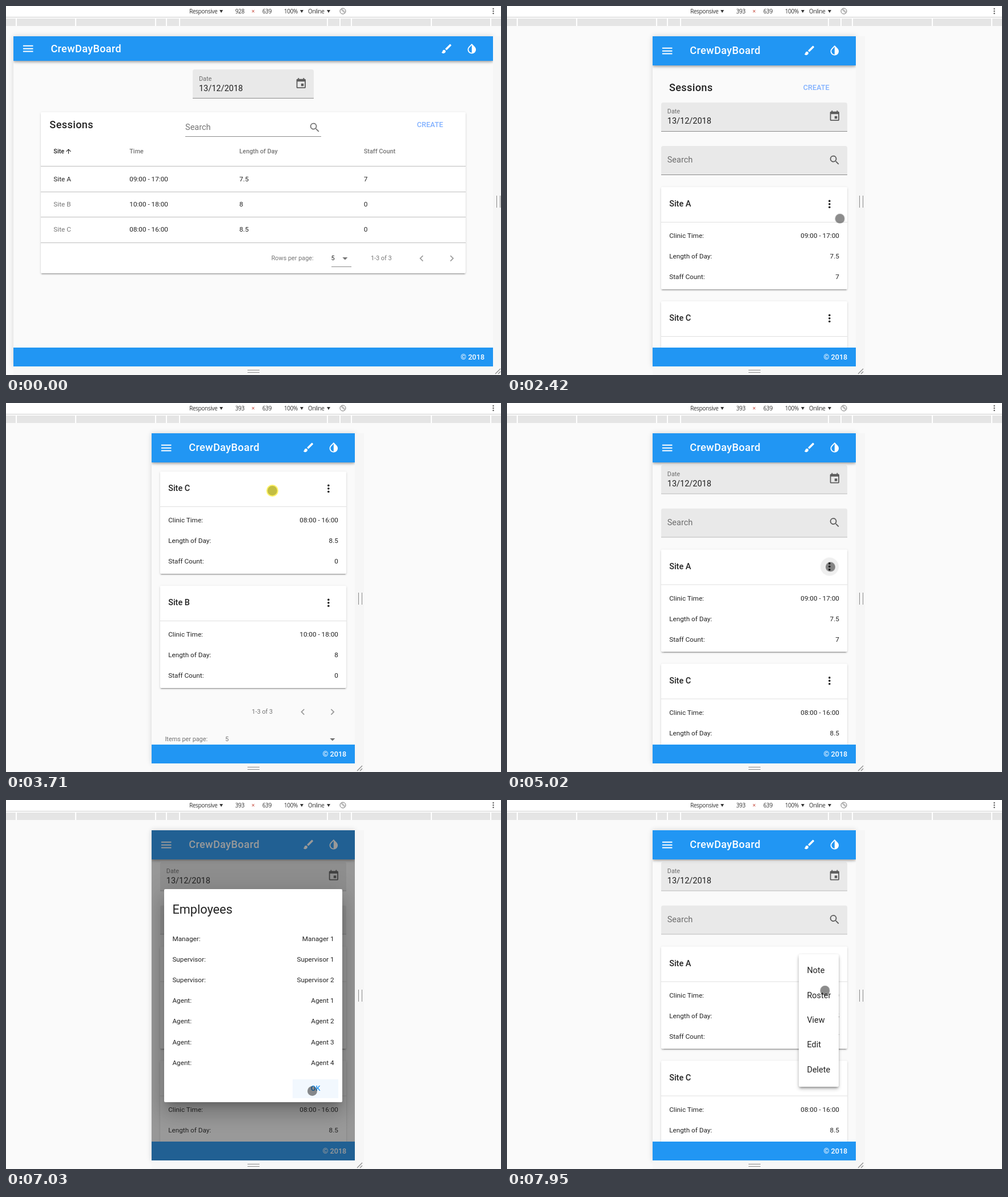
Recreate the animation shown at these times as an HTML page. Size 867 by 646 pixels, loop 8000 ms.

```html
<!DOCTYPE html>
<html lang="en">
<head>
<meta charset="utf-8">
<title>Sessions</title>
<style>
@property --w { syntax: "<integer>"; inherits: true; initial-value: 928; }
@property --lw { syntax: "<integer>"; inherits: true; initial-value: 928; }

html, body { margin: 0; width: 100%; height: 100%; overflow: hidden; }
.stage {
  position: relative; width: 867px; height: 646px; overflow: hidden;
  background: #fafafa; color: rgba(0,0,0,.87);
  font: 11.75px Roboto, sans-serif;
  --half: calc(var(--w) * .45215px);
  animation: resize 8s linear infinite;
}
.stage * { box-sizing: border-box; }
.stage div, .stage svg, p { position: absolute; }
p { margin: -10px 0 0; top: calc(var(--y) * 1px); line-height: 20px; white-space: nowrap; }
.i { width: 21.7px; height: 21.7px; margin: -10.85px; fill: currentColor; top: calc(var(--y) * 1px); }
.dim { color: rgba(0,0,0,.54); }
.small { font-size: 10.85px; }
.body { font-size: 14.47px; }
.med { font-weight: 500; }
.title { font-size: 18.1px; font-weight: 500; letter-spacing: .02em; }
.create { font-size: 12.66px; font-weight: 500; color: #82b1ff; }

/* browser chrome */
.tools { width: 100%; height: 20px; background: #fff; border-bottom: 1px solid #d0d0d0;
  font: 10px "Open Sans", sans-serif; letter-spacing: -.35px; color: #333; }
.tools p { top: 9px; }
.tools i { display: inline-block; margin-left: 4px; vertical-align: 1.5px; border: solid transparent; border-width: 5px 3px 0; border-top-color: #333; }
.width::after { counter-reset: w var(--w); content: counter(w); }
.ruler { top: 22px; width: 100%; height: 12.5px; background: #e5e5e5; }
.ruler div { width: 2px; height: 100%; background: #fff; }
.strip { top: 53px; left: calc(433px + var(--half)); width: 16px; height: 578px; background: #f6f6f6; animation: hot 8s step-end infinite; }
.strip::after { content: ""; position: absolute; left: 6px; top: 279px; width: 5px; height: 21px; border: solid #8a8a8a; border-width: 0 1px; }
.base { top: 631px; left: calc(433px - var(--half)); width: calc(2 * var(--half) + 16px); height: 15px; background: #f7f7f7; }
.grip { left: 423px; top: 637px; width: 21px; height: 5px; border: solid #8a8a8a; border-width: 1px 0; }
.corner { left: calc(433px + var(--half) + 3px); top: 634px; width: 11px; height: 11px; fill: none; stroke: #8a8a8a; stroke-width: 1.2; }

/* page; vertical positions count from the stage top */
.dev { top: 53px; left: calc(433px - var(--half)); width: calc(2 * var(--half)); height: 578px; overflow: hidden; background: #fafafa; }
.glow { top: 53px; left: calc(433px - var(--half)); width: calc(2 * var(--half)); height: 578px; box-shadow: 0 0 9px rgba(0,0,0,.16); }
.app { top: -53px; left: 0; width: calc(var(--lw) * .9043px); height: 631px; }
.fill { inset: 0; }
.bar { top: 53px; width: 100%; height: 43.4px; color: #fff; background: #2196f3;
  box-shadow: 0 2px 4px -1px rgba(0,0,0,.2), 0 3px 4px rgba(0,0,0,.14), 0 1px 8px rgba(0,0,0,.12);
  animation: bar 8s step-end infinite; }
.bar > * { top: 50%; }
.foot { top: 598px; width: 100%; height: 33px; background: #2196f3; color: #fff; font-size: 12.66px; }
.field { height: 51px; background: rgba(0,0,0,.065); border-bottom: 1px solid #8b8b8b; border-radius: 3.6px 3.6px 0 0; }
.field p { left: 11px; }
.field .i { right: 22px; color: rgba(0,0,0,.6); }
.card { background: #fff; border-radius: 2px;
  box-shadow: 0 3px 1px -2px rgba(0,0,0,.2), 0 2px 2px rgba(0,0,0,.14), 0 1px 4px rgba(0,0,0,.12); }

.desk { animation: leave 8s step-end infinite; }
.desk .field { left: calc(50% - 106px); top: 111px; width: 212px; }
.desk .card { top: 186px; height: 282px; left: calc(15.5px + 3.87%); right: calc(15.5px + 3.87%); }
.find { left: 34%; width: 32%; top: 0; height: 43px; border-bottom: 1px solid #8b8b8b; }
.line { width: 100%; height: 1px; background: #bdbdbd; top: calc(var(--y) * 1px); }
.c0 { left: 22px; }
.c1 { left: calc(18.06% + 20.7px); }
.c2 { left: calc(44.4% + 17.4px); }
.c3 { left: calc(73.6% + 18.4px); }

.mob { animation: enter 8s step-end infinite; }
.scroll { animation: scroll 8s ease-in-out infinite; }
.mob .field, .mob .card { left: 14.4px; right: 14.4px; }
.mob .card { height: 178.5px; }
.mob .card p { left: 14.4px; }
.card .r, .dialog .r { left: auto !important; right: 14.4px; }
.mob .line { background: #e0e0e0; }
.ring { right: 15px; top: 14px; width: 32px; height: 32px; border-radius: 50%; background: #efefef; opacity: 0; }
.first .ring { animation: ring 8s linear infinite; }

.menu { top: 270.3px; right: 29.7px; width: 70px; height: 231.7px; padding: 7.2px 14.4px; background: #fff; border-radius: 2px;
  font-size: 14.47px; line-height: 43.4px; transform-origin: 100% 0;
  box-shadow: 0 4px 4px -2px rgba(0,0,0,.22), 0 4px 6px rgba(0,0,0,.2), 0 1px 4px rgba(0,0,0,.14);
  animation: menu 8s ease-out infinite; }
.shade { background: #212121; animation: shade 8s ease-out infinite; }
.dialog { top: 155.5px; left: 21.7px; right: 21.7px; height: 372.5px; background: #fff; border-radius: 2px;
  box-shadow: 0 10px 13px -6px rgba(0,0,0,.2), 0 20px 34px 3px rgba(0,0,0,.14), 0 8px 40px 7px rgba(0,0,0,.12);
  animation: dialog 8s ease-out infinite; }
.dialog p { left: 14.4px; }
.ok { right: 7.2px; top: 333px; width: 79.5px; height: 33px; line-height: 31px; text-align: center; color: #2196f3;
  font-size: 12.66px; font-weight: 500; animation: ok 8s step-end infinite; }

/* pointers */
.touch { left: -8.5px; top: -8.5px; width: 17px; height: 17px; border-radius: 50%; background: rgba(0,0,0,.45);
  animation: touch 8s ease-in-out infinite, enterTouch 8s step-end infinite; }
.touch::after { content: ""; position: absolute; inset: -2px; border-radius: 50%; background: #c3be42; border: 2px solid #fff36b;
  animation: press 8s step-end infinite; }
.drag { left: -11px; top: 331.5px; width: 22px; height: 22px; animation: drag 8s linear infinite, leaveDrag 8s step-end infinite; }
.drag circle { fill: #fff23c; animation: hold 8s step-end infinite; }
.drag path { fill: #fffbc0; stroke: #333; stroke-width: 1; }

@keyframes resize {
  0%, 12.5% { --w: 928; }
  0%, 13.5% { --lw: 928; }
  15.4% { --w: 756; }
  16.375% { --w: 694; --lw: 756; animation-timing-function: ease-out; }
  17.4% { --lw: 694; animation-timing-function: ease-out; }
  23.25% { --w: 393; --lw: 404; }
  26.1% { --lw: 404; }
  26.15%, 100% { --lw: 393; }
  100% { --w: 393; }
}
@keyframes hot { 0% { background: #f6f6f6; } 9.6% { background: #ededed; } 26.6%, 100% { background: #f6f6f6; } }
@keyframes bar { 0% { height: 43.4px; } 18.6%, 100% { height: 50.6px; } }
@keyframes leave { 0% { opacity: 1; } 18.6%, 100% { opacity: 0; } }
@keyframes enter { 0% { opacity: 0; } 18.6%, 100% { opacity: 1; } }
@keyframes scroll {
  0%, 36.5% { transform: none; }
  44.4%, 46.4% { transform: translateY(-397px); }
  52.5%, 100% { transform: translateY(-60.5px); }
}
@keyframes ring {
  0%, 60.8% { opacity: 0; } 61.6%, 71.5% { opacity: 1; }
  72.5%, 94% { opacity: 0; } 94.6%, 100% { opacity: 1; }
}
@keyframes menu {
  0%, 63.8% { opacity: 0; transform: scale(.3); }
  66.2%, 71.4% { opacity: 1; transform: none; }
  73%, 73.1% { opacity: 0; transform: none; }
  73.2%, 95.4% { opacity: 0; transform: scale(.3); }
  97.4%, 100% { opacity: 1; transform: none; }
}
@keyframes shade { 0%, 71.5% { opacity: 0; } 74.5%, 90% { opacity: .46; } 91.7%, 100% { opacity: 0; } }
@keyframes dialog {
  0%, 71.5% { opacity: 0; transform: scale(.5); }
  74.5%, 90% { opacity: 1; transform: none; }
  91.7%, 100% { opacity: 0; transform: scale(.5); }
}
@keyframes ok { 0% { background: none; } 84.8%, 100% { background: #f2f8fe; } }
@keyframes touch {
  0%, 26.6% { transform: translate(619px, 343px); animation-timing-function: ease-in; }
  30.25% { transform: translate(583px, 371px); animation-timing-function: ease-out; }
  35.5%, 36.5% { transform: translate(478px, 550px); }
  44.4%, 46.4% { transform: translate(466px, 153px); }
  52.5% { transform: translate(476px, 489px); }
  56.2%, 56.9% { transform: translate(569px, 349px); }
  59%, 64.4% { transform: translate(566px, 286.5px); }
  70.5%, 76% { transform: translate(546px, 386px); }
  86%, 90% { transform: translate(536px, 509px); }
  94%, 96% { transform: translate(566px, 286.5px); }
  99.3%, 100% { transform: translate(556.5px, 333px); }
}
@keyframes enterTouch { 0% { opacity: 0; } 26.6%, 100% { opacity: 1; } }
@keyframes press {
  0% { opacity: 0; } 36% { opacity: 1; } 44.4% { opacity: 0; }
  46.3% { opacity: 1; } 52.5% { opacity: 0; }
  60.8% { opacity: 1; } 62.6% { opacity: 0; }
  70.5% { opacity: 1; } 71.5% { opacity: 0; }
  89% { opacity: 1; } 90% { opacity: 0; }
  94.3% { opacity: 1; } 95.4%, 100% { opacity: 0; }
}
@keyframes drag {
  0%, 9.4% { transform: translateX(880px); }
  11.5%, 12.5% { transform: translateX(861px); }
  16.375% { transform: translateX(740.5px); animation-timing-function: ease-out; }
  23.25%, 100% { transform: translateX(619px); }
}
@keyframes leaveDrag { 0% { opacity: 1; } 26.6%, 100% { opacity: 0; } }
@keyframes hold { 0% { opacity: 0; } 12.5% { opacity: 1; } 26.1%, 100% { opacity: 0; } }
</style>
</head>
<body>
<svg width="0" height="0" style="position:absolute">
  <symbol id="menu" viewBox="0 0 24 24"><path d="M3 18h18v-2H3zm0-5h18v-2H3zm0-7v2h18V6z"/></symbol>
  <symbol id="brush" viewBox="0 0 24 24"><path d="M7 14c-1.66 0-3 1.34-3 3 0 1.31-1.16 2-2 2 .92 1.22 2.49 2 4 2 2.21 0 4-1.79 4-4 0-1.66-1.34-3-3-3zm13.71-9.37l-1.34-1.34c-.39-.39-1.02-.39-1.41 0L9 12.25 11.75 15l8.96-8.96c.39-.39.39-1.02 0-1.41z"/></symbol>
  <symbol id="drop" viewBox="0 0 24 24"><path d="M17.66 7.93L12 2.27 6.34 7.93c-3.12 3.12-3.12 8.19 0 11.31a8 8 0 0 0 11.32 0c3.12-3.12 3.12-8.19 0-11.31zM12 19.59a6 6 0 0 1-4.24-10.24L12 5.1z"/></symbol>
  <symbol id="date" viewBox="0 0 24 24"><path d="M17 12h-5v5h5zM16 1v2H8V1H6v2H5c-1.1 0-2 .9-2 2v14c0 1.1.9 2 2 2h14c1.1 0 2-.9 2-2V5c0-1.1-.9-2-2-2h-1V1zm3 18H5V8h14z"/></symbol>
  <symbol id="search" viewBox="0 0 24 24"><path d="M15.5 14h-.79l-.28-.27A6.5 6.5 0 1 0 13.73 14.43l.27.28v.79l5 4.99L20.49 19zm-6 0a4.5 4.5 0 1 1 0-9 4.5 4.5 0 0 1 0 9z"/></symbol>
  <symbol id="up" viewBox="0 0 24 24"><path d="M4 12l1.41 1.41L11 7.83V20h2V7.83l5.58 5.59L20 12l-8-8z"/></symbol>
  <symbol id="more" viewBox="0 0 24 24"><circle cx="12" cy="6" r="2"/><circle cx="12" cy="12" r="2"/><circle cx="12" cy="18" r="2"/></symbol>
  <symbol id="prev" viewBox="0 0 24 24"><path d="M15.41 7.41L14 6l-6 6 6 6 1.41-1.41L10.83 12z"/></symbol>
  <symbol id="next" viewBox="0 0 24 24"><path d="M10 6L8.59 7.41 13.17 12l-4.58 4.59L10 18l6-6z"/></symbol>
  <symbol id="down" viewBox="0 0 24 24"><path d="M7 10l5 5 5-5z"/></symbol>
</svg>

<div class="stage">
  <div class="tools">
    <p style="left:321px">Responsive<i></i></p>
    <p class="width" style="left:401.5px"></p>
    <p style="left:430px;color:#c0392b">×</p>
    <p style="left:449px">639</p>
    <p style="left:487px">100%<i></i></p>
    <p style="left:529px">Online<i></i></p>
    <svg style="left:584px;top:3px" width="12" height="12" fill="none" stroke="#777"><circle cx="6" cy="6" r="5"/><path d="M2.5 2.5l7 7M4.5 2.2l5.2 5.2"/></svg>
    <svg style="left:851px;top:3px" width="5" height="12" fill="#555"><circle cx="2.5" cy="2" r="1.2"/><circle cx="2.5" cy="6" r="1.2"/><circle cx="2.5" cy="10" r="1.2"/></svg>
  </div>
  <div class="ruler" id="ruler"></div>

  <div class="glow"></div>
  <div class="base"></div>
  <div class="strip"></div>
  <div class="grip"></div>
  <svg class="corner" viewBox="0 0 11 11"><path d="M1 10L10 1M6 10l4-4"/></svg>

  <div class="dev"><div class="app">
    <div class="fill desk" id="desk"></div>
    <div class="fill mob"><div class="fill scroll" id="mob"></div></div>
    <div class="bar">
      <svg class="i" style="left:25.6px;width:23.4px;height:23.4px;margin:-11.7px"><use href="#menu"/></svg>
      <p class="title" style="left:65px">CrewDayBoard</p>
      <svg class="i" style="right:80.5px"><use href="#brush"/></svg>
      <svg class="i" style="right:36.8px"><use href="#drop"/></svg>
    </div>
    <div class="foot"><p class="med" style="right:14.4px;--y:16.5">© 2018</p></div>
    <div class="menu">Note<br>Roster<br>View<br>Edit<br>Delete</div>
    <div class="fill shade"></div>
    <div class="dialog" id="dialog"></div>
  </div></div>

  <div class="touch"></div>
  <svg class="drag" viewBox="-11 -11 22 22"><circle r="10.5"/><path d="M-10 0l5-4.5v3H5v-3L10 0 5 4.5v-3H-5v3z"/></svg>
</div>

<script>
const $ = id => document.getElementById(id);
const text = (s, y, cls = "", pos = "") => `<p class="${cls}" style="--y:${y};${pos}">${s}</p>`;
const icon = (name, y, pos = "", cls = "") => `<svg class="i ${cls}" style="--y:${y};${pos}"><use href="#${name}"/></svg>`;
const line = y => `<div class="line" style="--y:${y}"></div>`;
const pair = (label, value, y) => text(label, y) + text(value, y, "r");
const field = (top, inner) => `<div class="field" style="top:${top}px">${inner}</div>`;
const dateField = top => field(top, text("Date", 16.5, "small dim") + text("13/12/2018", 33.5, "body") + icon("date", 24.5));

const sites = {
  A: ["09:00 - 17:00", "7.5", 7],
  B: ["10:00 - 18:00", "8", 0],
  C: ["08:00 - 16:00", "8.5", 0]
};

$("ruler").innerHTML = [129.5, 152, 171.5, 311.5, 415.5]
  .flatMap(d => [432 - d, 432 + d])
  .map(x => `<div style="left:${Math.round(x)}px"></div>`).join("");

const rows = Object.entries(sites).map(([id, cells], r) => {
  const y = 116.5 + r * 44.4;
  return text("Site " + id, y, r ? "c0 dim" : "c0")
    + cells.map((c, i) => text(c, y, "c" + (i + 1))).join("") + line(138.5 + r * 44.5);
}).join("");
const heads = ["Time", "Length of Day", "Staff Count"]
  .map((h, i) => text(h, 68.5, `small med dim c${i + 1}`)).join("");

$("desk").innerHTML = dateField(111) + `<div class="card">
  ${text("Sessions", 22, "title", "left:15px")}
  <div class="find">${text("Search", 27, "body dim") + icon("search", 27, "right:11.5px", "dim")}</div>
  ${text("CREATE", 22, "create", "right:39px")}
  ${text("Site", 68.5, "small med c0")}${icon("up", 68, "left:48.5px;width:13px;height:13px;margin:-6.5px")}
  ${heads}${line(94)}${rows}
  ${text("Rows per page:", 255.5, "small dim", "right:266px")}
  ${text("5", 255.5, "small", "right:229px")}
  ${icon("down", 255.5, "right:211px", "dim")}
  <div style="right:200px;top:270px;width:35px;height:1px;background:#8b8b8b"></div>
  ${text("1-3 of 3", 255.5, "small dim", "right:129px")}
  ${icon("prev", 255.5, "right:77px;opacity:.7", "dim")}${icon("next", 255.5, "right:24px;opacity:.7", "dim")}
</div>`;

const cards = ["A", "C", "B"].map((id, i) => {
  const [time, length, staff] = sites[id];
  return `<div class="card ${i ? "" : "first"}" style="top:${317 + i * 200}px"><div class="ring"></div>
    ${text("Site " + id, 30, "body med")}${icon("more", 30.3, "right:31px")}${line(61)}
    ${pair("Clinic Time:", time, 84.5)}${pair("Length of Day:", length, 120.7)}${pair("Staff Count:", staff, 156.9)}</div>`;
}).join("");

$("mob").innerHTML = text("Sessions", 143, "title", "left:28.5px")
  + text("CREATE", 143, "create", "right:46px")
  + dateField(168.5)
  + field(244.5, text("Search", 25, "body dim") + icon("search", 25))
  + cards
  + text("1-3 of 3", 938, "small dim", "right:143.5px")
  + icon("prev", 938, "right:91px;opacity:.7", "dim") + icon("next", 938, "right:38.5px;opacity:.7", "dim")
  + text("Items per page:", 986, "small dim", "left:23px")
  + text("5", 986, "small dim", "left:128.5px") + icon("down", 986, "right:38.5px", "dim");

const staff = ["Manager 1", "Supervisor 1", "Supervisor 2", "Agent 1", "Agent 2", "Agent 3", "Agent 4"];
$("dialog").innerHTML = text("Employees", 36, "", "font-size:21.7px")
  + staff.map((s, i) => pair(s.split(" ")[0] + ":", s, 86.5 + i * 36.2)).join("")
  + `<div class="ok">OK</div>`;
</script>
</body>
</html>
```
